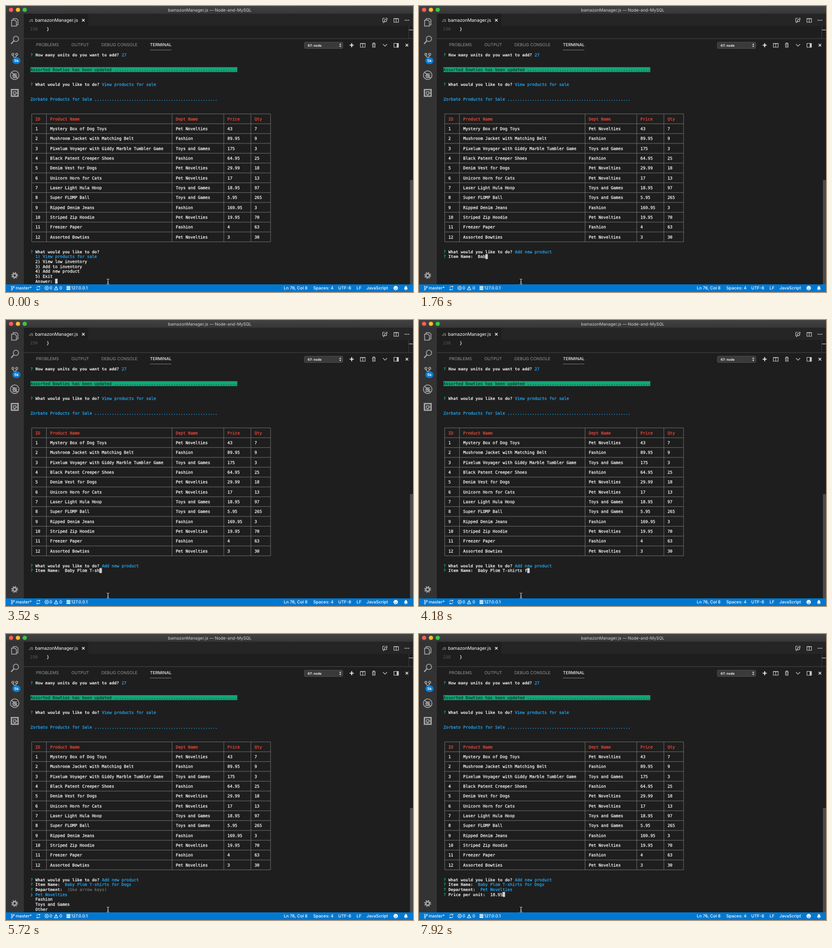
Animation, 800 px wide and 562 px high, one loop 8 s. Source, as an HTML page:

```html
<!DOCTYPE html>
<html lang="en">
<head>
<meta charset="utf-8">
<title>Terminal session</title>
<style>
  html, body { margin: 0; width: 100%; height: 100%; overflow: hidden; background: #1e1e1e; }
  svg { display: block; width: 800px; height: 562px; }
  text { font: 8.3px Inter, "Open Sans", sans-serif; text-rendering: geometricPrecision; white-space: pre; }
  .mono text {
    font: 8.04px "DejaVu Sans Mono", "Liberation Mono", monospace;
    color: #f2f2f2; fill: currentColor; stroke: currentColor; stroke-width: .28;
  }
  .mono .bold { font-weight: bold; stroke-width: 0; }
  .mono .blue { color: #22a3ee; }
  .mono .green { color: #14bd84; }
  .mono .red { color: #e8483a; }
  .mono .grey { color: #808080; stroke-width: .1; }
  .mono .black { color: #0c2a20; stroke-width: .15; }
  .line { fill: none; stroke: #c5c5c5; stroke-width: 1.1; }
  .side { fill: none; stroke: #a9a9a9; stroke-width: 1.5; }
  .status text { fill: #fff; font-weight: 500; }
  .status .line { stroke: #fff; stroke-width: 1; }
</style>
</head>
<body>
<svg viewBox="0 0 800 562">
  <defs>
    <linearGradient id="bar" x2="0" y2="1">
      <stop stop-color="#424242"/><stop offset="1" stop-color="#363636"/>
    </linearGradient>
  </defs>
  <rect width="800" height="562" fill="#1e1e1e"/>

  <!-- title bar -->
  <rect width="800" height="15.5" fill="url(#bar)"/>
  <circle cx="10" cy="7.5" r="4.1" fill="#fc5b57"/>
  <circle cx="23.5" cy="7.5" r="4.1" fill="#fdbc33"/>
  <circle cx="36.8" cy="7.5" r="4.1" fill="#34c84a"/>
  <text x="400.5" y="10.5" text-anchor="middle" fill="#d2d2d2">bamazonManager.js — Node-and-MySQL</text>

  <!-- editor -->
  <rect x="35" y="15.5" width="765" height="23.5" fill="#252526"/>
  <rect x="35" y="15.5" width="126.5" height="23.5" fill="#1e1e1e"/>
  <text x="45" y="30.5" style="font-size:7px" fill="#c9c9ae">JS</text>
  <text x="57" y="31" style="font-size:8.9px" fill="#fff">bamazonManager.js</text>
  <path class="line" style="stroke:#fff" d="M149.500 25.500l5 5m0-5l-5 5"/>
  <g class="line">
    <path d="M740.500 24h4M740.500 24v7h3M746 24h3v3"/>
    <circle cx="746" cy="28.500" r="2.300"/><path d="M744.400 30.300l-3 3"/>
    <path d="M762.500 24.500h9v7.500h-9zM767 24.500v7.500M762.500 25h9"/>
  </g>
  <path d="M784.500 28h.1m3.400 0h.1m3.400 0h.1" stroke="#d0d0d0" stroke-width="2" stroke-linecap="round"/>
  <g class="mono">
    <text x="47.500" y="48" style="color:#5c5c5c;stroke-width:0">230</text>
    <text x="80" y="48">}</text>
  </g>
  <path d="M791.500 39v25" stroke="#3a3a3a"/>
  <path d="M792 47h8" stroke="#a0a0a0" stroke-width="1.500"/>

  <!-- panel header -->
  <path d="M35 64h765" stroke="#474747"/>
  <g fill="#959595">
    <text x="59" y="79">PROBLEMS</text>
    <text x="128.500" y="79">OUTPUT</text>
    <text x="187.500" y="79">DEBUG CONSOLE</text>
    <text x="283" y="79" fill="#f0f0f0" style="font-weight:500">TERMINAL</text>
  </g>
  <path d="M283 86.500h42" stroke="#8c8c8c" stroke-width=".8"/>
  <rect x="586.500" y="71" width="75.500" height="12.500" rx="2" fill="#3a3a3a" stroke="#555" stroke-width=".8"/>
  <text x="593" y="79.700" style="font-size:6.5px;font-weight:700" fill="#f0f0f0">67: node</text>
  <path d="M655 76.300l2-2.800 2 2.800zM655 78.300l2 2.800 2-2.800z" fill="#e5e5e5"/>
  <g class="line">
    <path style="stroke:#fff;stroke-width:1.7" d="M675.500 77h8M679.500 73v8"/>
    <path d="M696.500 73.500h9.500v7.500h-9.500zM701.200 73.500v7.500M696.500 74h9.500"/>
    <path d="M719.500 74.500h7M721.500 74v-1.500h3V74M720.500 75v6h5v-6M723 76v4"/>
    <path d="M741 75l4 4 4-4"/>
    <path d="M762.500 73.500h9v7.500h-9z"/><path d="M768.500 74v7h2.500v-7z" fill="#c5c5c5"/>
    <path style="stroke:#e8e8e8;stroke-width:1.4" d="M785.500 74.500l5 5m0-5l-5 5"/>
  </g>

  <!-- activity bar -->
  <rect y="15.500" width="35" height="531.500" fill="#333"/>
  <g class="side">
    <path d="M14 27V24.700h6.500l3 3v9.300H21.500M11 27.700h6.500l3 3V39.500H11z"/>
    <circle cx="19.500" cy="64.500" r="5.200"/><path stroke-width="2.200" d="M15.500 68.500l-5.500 6"/>
    <circle cx="13.500" cy="95" r="2"/><circle cx="21" cy="95" r="2"/><path d="M13.500 97c0 4 4 2 4 6M21 97c0 4-3.500 2-3.500 6"/>
    <circle cx="17" cy="136" r="8.500"/><path d="M11 130l12 12"/>
    <ellipse cx="17" cy="137" rx="2.800" ry="4"/><path stroke-width="1.100" d="M11.500 137h11M12.500 141.500l2.500-2M21.500 141.500l-2.500-2M12.500 132.500l2.500 2M21.500 132.500l-2.500 2M17 133v8"/>
    <path stroke-width="2.600" d="M10.700 164.300h13v13h-13z"/><path d="M14.500 168.500h5v5h-5zM17 174v4M20 171h4"/>
    <circle cx="17" cy="529.500" r="3.500" stroke-width="2.400"/>
    <circle cx="17" cy="529.500" r="5.600" stroke-width="2.200" stroke-dasharray="2.200 2.198"/>
  </g>
  <rect x="12.500" y="101" width="16" height="13" rx="6.500" fill="#0a7bd0"/>
  <text x="20.500" y="110.300" text-anchor="middle" style="font-size:7px;font-weight:700" fill="#fff">5k</text>

  <rect x="794" y="342" width="6" height="205" fill="#4c4c4c"/>
  <g id="terminal" class="mono"></g>
  <g id="session" class="mono"></g>

  <!-- status bar -->
  <rect y="547" width="800" height="15" fill="#0078d2"/>
  <g class="status">
    <g class="line">
      <circle cx="11.500" cy="551.500" r="1.100"/><circle cx="11.500" cy="557.500" r="1.100"/><circle cx="15.500" cy="552" r="1.100"/>
      <path d="M11.500 552.500v4M15.500 553c0 2-3 1.500-4 3"/>
      <path d="M60.300 553.500a3.400 3.400 0 0 1 6-1.500m.2-1.800v2h-2M66.700 555a3.400 3.400 0 0 1-6 1.500m-.2 1.800v-2h2"/>
      <circle cx="80" cy="554.200" r="3.600"/><path d="M78.500 552.700l3 3m0-3l-3 3"/>
      <path d="M98.500 550.700l3.600 7h-7.200zM98.500 553v2.500"/>
    </g>
    <path d="M119 550.500h7.500v2H119zM119 553.300h7.500v2H119zM119 556.100h7.500v2H119z" fill="#fff"/>
    <text x="19" y="557.200">master*</text>
    <text x="85.500" y="557.200">0</text>
    <text x="105" y="557.200">0</text>
    <text x="128" y="557.200">127.0.0.1</text>
    <text x="546" y="557.200">Ln 76, Col 8</text>
    <text x="604" y="557.200">Spaces: 4</text>
    <text x="653" y="557.200">UTF-8</text>
    <text x="689" y="557.200">LF</text>
    <text x="708.500" y="557.200">JavaScript</text>
    <circle cx="766" cy="554.200" r="4.300" fill="#fff"/>
    <path d="M764.500 552.500v1m3-1v1M763.500 555.300q2.500 2.700 5 0" fill="none" stroke="#0078d2"/>
    <path d="M782 557q1.500-1 1.500-3.500c0-4 5-4 5 0q0 2.500 1.500 3.500zM785 557.700h2v1h-2z" fill="#fff"/>
  </g>

  <!-- pointer -->
  <path d="M198 536.500q2.500 0 2.500 1.500v7q0 1.500-2.500 1.500M203 536.500q-2.500 0-2.500 1.500v7q0 1.500 2.500 1.500M199.300 542.500h2.400" fill="none" stroke="#e8e8e8" stroke-width=".9"/>
</svg>
<script>
const COL = 4.84, ROW = 9.667, LEFT = 48.1, TOP = 96;
const LOOP = 8000, TICK = 110;
const colX = col => LEFT + col * COL;
const rowY = row => TOP + row * ROW;

function add(parent, tag, attrs, content = '') {
  const node = document.createElementNS('http://www.w3.org/2000/svg', tag);
  for (const key in attrs) node.setAttribute(key, attrs[key]);
  node.textContent = content;
  parent.append(node);
}
const write = (parent, row, col, content, style = '') =>
  add(parent, 'text', { x: colX(col), y: rowY(row) + 2.9, class: style }, content);
const block = (parent, row, col, width, fill) =>
  add(parent, 'rect', { x: colX(col), y: rowY(row) - 4.8, width: width * COL, height: ROW, fill });

function prompt(parent, row, question, answer = '', style = 'blue', gap = 1) {
  write(parent, row, 0, '?', 'green bold');
  write(parent, row, 2, question, 'bold');
  if (answer) write(parent, row, 2 + question.length + gap, answer, style);
}
function input(parent, row, question, typed) {
  const col = 4 + question.length;
  prompt(parent, row, question, typed, '', 2);
  block(parent, row, col + typed.length, 1, '#d2d2d2');
}

const dots = '.'.repeat(50);
const departments = ['Pet Novelties', 'Fashion', 'Toys and Games', 'Other'];
const [pets, fashion, toys] = departments;
const products = [
  ['ID', 'Product Name', 'Dept Name', 'Price', 'Qty'],
  [1, 'Mystery Box of Dog Toys', pets, 43, 7],
  [2, 'Mushroom Jacket with Matching Belt', fashion, 89.95, 9],
  [3, 'Pixelum Voyager with Giddy Marble Tumbler Game', toys, 175, 3],
  [4, 'Black Patent Creeper Shoes', fashion, 64.95, 25],
  [5, 'Denim Vest for Dogs', pets, 29.99, 18],
  [6, 'Unicorn Horn for Cats', pets, 17, 13],
  [7, 'Laser Light Hula Hoop', toys, 18.95, 97],
  [8, 'Super FLOMP Ball', toys, 5.95, 265],
  [9, 'Ripped Denim Jeans', fashion, 169.95, 3],
  [10, 'Striped Zip Hoodie', pets, 19.95, 70],
  [11, 'Freezer Paper', fashion, 4, 63],
  [12, 'Assorted Bowties', pets, 3, 30]
];

function drawHistory(parent) {
  prompt(parent, 0, 'How many units do you want to add?', '27');
  block(parent, 3, 0, 84, '#10a678');
  write(parent, 3, 0, 'Assorted Bowties has been updated ' + dots, 'black');
  prompt(parent, 6, 'What would you like to do?', 'View products for sale');
  write(parent, 9, 0, 'Zorbato Products for Sale ' + dots, 'blue');

  const edges = [0, 6, 57, 78, 89, 97];
  const x = col => colX(col + .5);
  let grid = '';
  for (const col of edges) grid += `M${x(col)} ${rowY(12)}V${rowY(38)}`;
  for (let row = 12; row <= 38; row += 2) grid += `M${x(0)} ${rowY(row)}H${x(97)}`;
  add(parent, 'path', { d: grid, stroke: '#747474', 'stroke-width': .9 });
  products.forEach((cells, i) => cells.forEach((cell, j) =>
    write(parent, 13 + 2 * i, edges[j] + 2, cell, i ? '' : 'red')));
}

const menu = ['View products for sale', 'View low inventory', 'Add to inventory', 'Add new product', 'Exit'];
const itemName = 'Baby Plom T-shirts for Dogs';
const price = '18.95';

// Times below count in ticks of 110 ms.
const CHOOSE = 4, CONFIRM = 7, NAMED = 45, DEPARTMENT = 54;
const nameKeys = [13, 15, 16, 17, 19, 20, 21, 22, 23, 24, 26, 28,
  31, 32, 33, 34, 35, 36, 37, 38, 39, 39, 40, 41, 42, 43, 43];
const priceKeys = [62, 64, 66, 68, 70];
const typedBy = (tick, content, keys) => content.slice(0, keys.filter(key => key <= tick).length);

function drawSession(parent, tick) {
  parent.replaceChildren();
  const question = 'What would you like to do?';
  if (tick < CONFIRM) {
    const chosen = tick < CHOOSE ? 0 : 3;
    const answer = tick < CHOOSE ? '' : '4';
    prompt(parent, 40, question);
    menu.forEach((item, i) => write(parent, 41 + i, 2, `${i + 1}) ${item}`, i === chosen ? 'blue' : ''));
    write(parent, 46, 2, 'Answer: ' + answer);
    block(parent, 46, 10 + answer.length, 1, '#d2d2d2');
    return;
  }
  prompt(parent, 40, question, menu[3]);
  if (tick < NAMED) {
    input(parent, 41, 'Item Name:', typedBy(tick, itemName, nameKeys));
    return;
  }
  prompt(parent, 41, 'Item Name:', itemName, 'blue', 2);
  if (tick < DEPARTMENT) {
    prompt(parent, 42, 'Department:', '(Use arrow keys)', 'grey', 2);
    write(parent, 43, 0, '❯', 'blue');
    departments.forEach((name, i) => write(parent, 43 + i, 2, name, i ? '' : 'blue'));
    return;
  }
  prompt(parent, 42, 'Department:', pets, 'blue', 2);
  input(parent, 43, 'Price per unit:', typedBy(tick, price, priceKeys));
}

const session = document.getElementById('session');
let shown = -1;
function frame() {
  const tick = Math.floor(performance.now() % LOOP / TICK);
  if (tick !== shown) drawSession(session, shown = tick);
  requestAnimationFrame(frame);
}
drawHistory(document.getElementById('terminal'));
frame();
</script>
</body>
</html>
```
